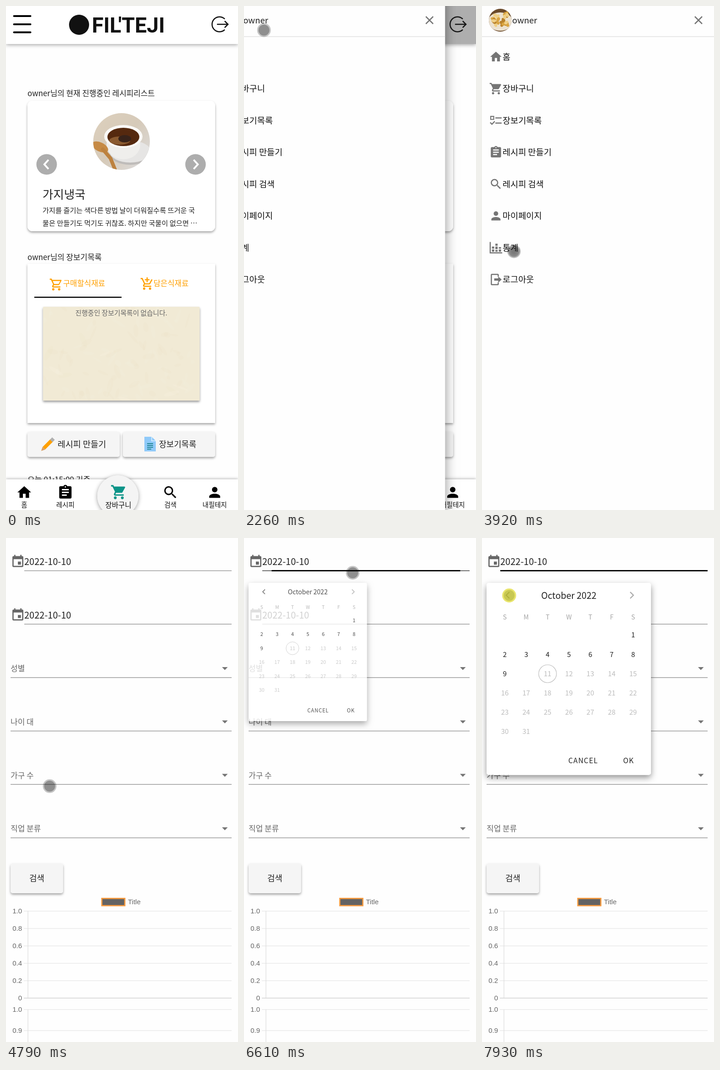
An HTML page with a canvas for the animation above (8 s loop, 508 by 1101 pixels).

```html
<!DOCTYPE html>
<html lang="ko">
<head>
<meta charset="utf-8">
<title>Recipe app</title>
<style>
html, body { margin: 0; width: 100%; height: 100%; overflow: hidden; background: #fff; }
canvas { display: block; width: 100%; height: 100%; }
</style>
</head>
<body>
<canvas id="stage" width="508" height="1101"></canvas>
<script>
const W = 508, H = 1101, LOOP = 8000;
const c = document.getElementById('stage').getContext('2d');
const KR = '"Noto Sans CJK KR", "Noto Sans CJK", "Noto Sans", sans-serif';
const ARIAL = '"Liberation Sans", sans-serif';
const USER = 'owner', BRAND = "FIL'TEJI";
const ORANGE = '#ffa000', GREY = '#757575', INK = '#212121';

const wheels = 'M17 18a2 2 0 1 1 0 4a2 2 0 1 1 0-4zM7 18a2 2 0 1 1 0 4a2 2 0 1 1 0-4z';
const cartBody = 'M1 2H4.27L5.21 4H20A1 1 0 0 1 21 5C21 5.17 20.95 5.34 20.88 5.5L17.3 11.97C16.96 12.58 16.3 13 15.55 13H8.1L7.2 14.63L7.17 14.75A.25 .25 0 0 0 7.42 15H19V17H7C5.89 17 5 16.1 5 15C5 14.65 5.09 14.32 5.24 14.04L6.6 11.59L3 4H1z';
const icons = {
  home: 'M10 20v-6h4v6h5v-8h3L12 3 2 12h3v8z',
  cart: cartBody + wheels,
  cartOpen: cartBody + wheels + 'M16 11L18.78 6H6.14L8.5 11z',
  cartPlus: 'M11 9H13V6H16V4H13V1H11V4H8V6H11zM7.17 14.75L8.1 13H15.55C16.3 13 16.96 12.59 17.3 11.97L21.16 4.96L19.42 4L15.55 11H8.53L4.27 2H1V4H3L6.6 11.59L5.25 14.04A2 2 0 0 0 7 17H19V15H7.42z' + wheels,
  clip: 'M17 9H7V7H17zM17 13H7V11H17zM14 17H7V15H14zM12 3a1 1 0 1 1 0 2a1 1 0 1 1 0-2zM19 3H14.82C14.4 1.84 13.3 1 12 1S9.6 1.84 9.18 3H5A2 2 0 0 0 3 5V19A2 2 0 0 0 5 21H19A2 2 0 0 0 21 19V5A2 2 0 0 0 19 3z',
  search: 'M9.5 3A6.5 6.5 0 0 1 16 9.5C16 11.11 15.41 12.59 14.44 13.73L14.71 14H15.5L20.5 19L19 20.5L14 15.5V14.71L13.73 14.44A6.5 6.5 0 1 1 9.5 3zM9.5 5a4.5 4.5 0 1 0 0 9a4.5 4.5 0 1 0 0-9z',
  person: 'M12 4a4 4 0 1 1 0 8a4 4 0 1 1 0-8zM12 14C16.42 14 20 15.79 20 18V20H4V18C4 15.79 7.58 14 12 14z',
  date: 'M19 19H5V8H19zM16 1V3H8V1H6V3H5A2 2 0 0 0 3 5V19A2 2 0 0 0 5 21H19A2 2 0 0 0 21 19V5A2 2 0 0 0 19 3H18V1zM17 12H12V17H17z',
  checks: 'M2 4h7v7h-7zM3.7 5.7h3.6v3.6h-3.6zM11 6.5h11v2h-11zM11 15.5h11v2h-11zM1.3 16.2l1.4-1.4 2.3 2.3 4.3-4.3 1.4 1.4-5.7 5.7z',
  chart: 'M1 2h2v18h20v2h-22zM5 15h4v4h-4zM5 10h4v3.5h-4zM11 16h4v3h-4zM11 10h4v4.5h-4zM11 5h4v3.5h-4zM17 15h4v4h-4zM17 11h4v2.5h-4z',
  exit: 'M5 2h10a2 2 0 0 1 2 2v3h-2v-3h-10v16h10v-3h2v3a2 2 0 0 1-2 2h-10a2 2 0 0 1-2-2v-16a2 2 0 0 1 2-2zM9 10h7v-3.5l6 5.5-6 5.5v-3.5h-7z'
};
for (const k in icons) icons[k] = new Path2D(icons[k]);

function icon(name, x, y, size, color) {
  c.save();
  c.translate(x - size / 2, y - size / 2);
  c.scale(size / 24, size / 24);
  c.fillStyle = color;
  c.fill(icons[name], 'evenodd');
  c.restore();
}

// y is the optical middle of the line
function text(s, x, y, size, color = INK, align = 'left', family = KR, weight = 400) {
  c.font = `${weight} ${size}px ${family}`;
  c.textAlign = align;
  c.fillStyle = color;
  c.fillText(s, x, y + size * 0.365);
}

function rect(x, y, w, h, color) {
  c.fillStyle = color;
  c.fillRect(x, y, w, h);
}

function disc(x, y, r, color) {
  c.fillStyle = color;
  c.beginPath();
  c.arc(x, y, r, 0, 7);
  c.fill();
}

function oval(x, y, rx, ry, color, turn = 0) {
  c.fillStyle = color;
  c.beginPath();
  c.ellipse(x, y, rx, ry, turn, 0, 7);
  c.fill();
}

function line(color, width, ...p) {
  c.strokeStyle = color;
  c.lineWidth = width;
  c.beginPath();
  for (let i = 0; i < p.length; i += 2) c.lineTo(p[i], p[i + 1]);
  c.stroke();
}

// The shadow is kept outside the box, so see-through panels stay clean.
function panel(x, y, w, h, r, color, dy = 3, blur = 5, alpha = 0.35) {
  const box = new Path2D();
  box.roundRect(x, y, w, h, r);
  const outside = new Path2D(box);
  outside.rect(-W, -H, 3 * W, 3 * H);
  c.save();
  c.clip(outside, 'evenodd');
  c.shadowColor = `rgba(0,0,0,${alpha})`;
  c.shadowBlur = blur;
  c.shadowOffsetY = dy;
  c.fillStyle = color;
  c.fill(box);
  c.restore();
  c.fillStyle = color;
  c.fill(box);
}

function bezier(x1, y1, x2, y2, x) {
  if (x <= 0) return 0;
  if (x >= 1) return 1;
  const at = (a, b, u) => 3 * (1 - u) ** 2 * u * a + 3 * (1 - u) * u * u * b + u ** 3;
  let lo = 0, hi = 1;
  for (let i = 0; i < 24; i++) {
    const mid = (lo + hi) / 2;
    if (at(x1, x2, mid) < x) lo = mid; else hi = mid;
  }
  return at(y1, y2, lo);
}

function seeded(seed) {
  return () => (seed = (seed * 16807) % 2147483647) / 2147483647;
}

function inCircle(x, y, r, draw) {
  c.save();
  c.beginPath();
  c.arc(x, y, r, 0, 7);
  c.clip();
  draw();
  c.restore();
}

function soup() {
  inCircle(253, 296, 62, () => {
    const g = c.createLinearGradient(191, 240, 315, 350);
    g.addColorStop(0, '#ddd0bd');
    g.addColorStop(0.5, '#d6cab9');
    g.addColorStop(1, '#dcdcde');
    rect(190, 233, 126, 126, g);
    oval(272, 322, 45, 25, '#bfbcba');
    oval(272, 318, 45, 24, '#e6e5e4');
    oval(257, 303, 37, 32, '#efeeec');
    oval(257, 285, 42, 25, '#fbfaf8');
    oval(257, 286, 35, 20, '#55290f');
    oval(249, 294, 23, 9, '#8a5a30');
    oval(260, 290, 14, 8, '#38231a');
    oval(206, 308, 19, 10, '#c68a45', 0.45);
    c.lineCap = 'round';
    line('#bd813e', 8, 212, 313, 229, 333, 239, 358);
  });
}

function snack() {
  inCircle(40, 31, 25, () => {
    rect(15, 6, 50, 50, '#6b4a2a');
    oval(40, 34, 27, 20, '#ece2d0');
    const rnd = seeded(41);
    for (let i = 0; i < 26; i++) {
      oval(24 + rnd() * 32, 16 + rnd() * 28, 5, 3.5, ['#d9a441', '#efcf86', '#b9822c'][i % 3], rnd() * 3);
    }
  });
}

function paper() {
  panel(81, 657, 343, 205, 2, '#f1ead5', 3, 5, 0.4);
  c.save();
  c.beginPath();
  c.rect(81, 657, 343, 205);
  c.clip();
  const rnd = seeded(77);
  for (let i = 0; i < 120; i++) {
    oval(81 + rnd() * 343, 657 + rnd() * 205, 4 + rnd() * 14, 2 + rnd() * 4,
      i % 2 ? 'rgba(225,212,175,.08)' : 'rgba(250,246,232,.12)', rnd() * 3);
  }
  c.restore();
}

function arrowButton(x, dir) {
  disc(x, 346, 22.5, '#adadad');
  c.lineCap = 'butt';
  line('#fff', 4, x - 4 * dir, 336, x + 5 * dir, 346, x - 4 * dir, 356);
}

function header() {
  panel(0, -10, W, 93, 0, '#fff', 2, 8, 0.35);
  c.lineCap = 'round';
  for (const y of [22, 40, 57.5]) line('#000', 4, 17.5, y, 53.5, y);
  disc(160, 41, 22, '#111');
  text(BRAND, 188, 41, 46.5, '#111', 'left', 'Roboto, sans-serif', 700);
  c.strokeStyle = '#111';
  c.lineWidth = 2.5;
  c.beginPath();
  c.arc(467.5, 40, 16.3, 0.85, Math.PI * 2 - 0.85);
  c.stroke();
  line('#111', 2.5, 463, 40, 486, 40);
  line('#111', 2.5, 479.5, 33.5, 486, 40, 479.5, 46.5);
}

function nav() {
  panel(0, 1034, W, 80, 0, '#fff', -1, 6, 0.3);
  panel(200, 1025.5, 90, 90, 45, '#f4f4f4', 2, 10, 0.38);
  [['home', 40, '홈'], ['clip', 130, '레시피'], ['search', 360, '검색'], ['person', 457, '내필테지']].forEach(([name, x, label]) => {
    icon(name, x, 1062.5, 36, '#000');
    text(label, x, 1090, 14.5, '#111', 'center');
  });
  icon('cart', 247, 1062, 37, '#0c9488');
  text('장바구니', 246, 1090.5, 15.5, '#111', 'center');
}

function home(t) {
  rect(0, 0, W, H, '#fefefe');
  text(USER + '님의 현재 진행중인 레시피리스트', 47, 191, 16.9);
  panel(47, 207, 411, 285, 11, '#fff');
  soup();
  arrowButton(89, -1);
  arrowButton(415, 1);
  text('가지냉국', 80, 412, 25.5);
  text('가지를 즐기는 색다른 방법 날이 더워질수록 뜨거운 국', 80, 446, 15.3);
  text('물은 만들기도 먹기도 귀찮죠. 하지만 국물이 없으면 …', 80, 474, 15.3);

  text(USER + '님의 장보기목록', 47, 548.5, 16.9);
  panel(47, 563, 411, 348, 0, '#fff');
  icon('cartOpen', 110, 608.5, 31, ORANGE);
  icon('cartPlus', 309, 607, 31, ORANGE);
  text('구매할식재료', 125, 605.5, 16.7, ORANGE, 'left', KR, 500);
  text('담은식재료', 323, 605.5, 16.7, ORANGE, 'left', KR, 500);
  rect(62, 635, 191, 2.5, '#000');
  paper();
  text('진행중인 장보기목록이 없습니다.', 252.5, 671, 14.8, '#666', 'center');

  panel(47, 930, 202, 55, 5, '#f5f5f5');
  panel(256, 930, 202, 55, 5, '#f5f5f5');
  c.lineCap = 'butt';
  line(ORANGE, 8, 83, 966, 100, 949);
  line('#b0b0b0', 8, 99, 950, 104, 945);
  c.fillStyle = '#d9a066';
  c.beginPath();
  c.moveTo(80, 963); c.lineTo(86, 969); c.lineTo(77, 972);
  c.fill();
  text('레시피 만들기', 113, 957.5, 18.5);
  c.fillStyle = '#90caf9';
  c.beginPath();
  c.moveTo(303, 941); c.lineTo(319, 941); c.lineTo(328, 950); c.lineTo(328, 973); c.lineTo(303, 973);
  c.fill();
  line('#e1f5fe', 1.5, 319, 941, 319, 950, 328, 950);
  for (let i = 0; i < 4; i++) rect(309, 955 + i * 4, i === 3 ? 9 : 13, 1.8, '#17808a');
  text('장보기목록', 335, 957.5, 17.8);

  const sec = 9 + (t >= 240) + (t >= 1240);
  text(`오늘 01:15:${String(sec).padStart(2, '0')} 기준`, 47, 1034.5, 17.2);
  header();
  nav();
}

function drawer(p) {
  c.save();
  c.translate(W * (p - 1), 0);
  panel(0, -60, W, H + 120, 0, '#fefefe', 0, p < 1 ? 24 : 0, 0.45);
  rect(0, 66, W, 1.5, '#e2e2e2');
  snack();
  text(USER, 66, 31.5, 18.5);
  c.lineCap = 'butt';
  line(GREY, 2.5, 466, 23, 482, 39);
  line(GREY, 2.5, 482, 23, 466, 39);
  [['home', '홈'], ['cart', '장바구니'], ['checks', '장보기목록'], ['clip', '레시피 만들기'],
   ['search', '레시피 검색'], ['person', '마이페이지'], ['chart', '통계'], ['exit', '로그아웃']].forEach(([name, label], i) => {
    const y = 111 + i * 69.5;
    icon(name, 30.5, y, 30, GREY);
    text(label, 45, y, 18.7, '#111');
  });
  c.restore();
}

function axis(top, step, labels, bottom) {
  labels.forEach((s, i) => {
    const y = top + i * step;
    text(s, 35, y, 15, '#666', 'right', ARIAL);
    rect(39, y - 0.5, 455, 1.2, s === '0' ? '#c8c8c8' : '#e5e5e5');
  });
  rect(47.5, top, 1.2, bottom - top, '#dcdcdc');
}

function stats(t) {
  rect(0, 0, W, H, '#fefefe');
  const focus = bezier(0.25, 0.8, 0.5, 1, (t - 6433) / 300);
  const row = i => 71.5 + 116.7 * i;
  ['2022-10-10', '2022-10-10', '성별', '나이 대', '가구 수', '직업 분류'].forEach((s, i) => {
    const y = row(i), dated = i < 2;
    if (dated) {
      icon('date', 26, y - 20, 32, '#666');
      text(s, 40, y - 20, 20);
    } else {
      text(s, 10, y - 20, 17, '#666');
      c.fillStyle = GREY;
      c.beginPath();
      c.moveTo(473, y - 23); c.lineTo(485.5, y - 23); c.lineTo(479.2, y - 16.5);
      c.fill();
    }
    const x = dated ? 40 : 10;
    rect(x, y - 0.7, 494 - x, 1.4, i === 0 && focus > 0 ? '#333' : '#949494');
  });
  if (focus > 0) rect(267 - 227 * focus, 70, 454 * focus, 2.8, '#000');

  panel(10, 711, 115, 65, 5, '#f5f5f5');
  text('검색', 67.5, 743.5, 18, INK, 'center');
  rect(208.5, 786, 53, 18.5, '#f89b3f');
  rect(211.2, 788.7, 47.6, 13.1, '#636363');
  text('Title', 267, 795, 15, '#666', 'left', ARIAL);
  axis(815, 38, ['1.0', '0.8', '0.6', '0.4', '0.2', '0'], 1005);
  axis(1030, 46, ['1.0', '0.9'], H);

  const open = bezier(0.25, 0.8, 0.5, 1, (t - 6500) / 300);
  if (open > 0) picker(open);
}

function picker(p) {
  c.save();
  c.globalAlpha = Math.min(1, p * 1.1);
  c.translate(10, 98);
  c.scale(p, p);
  c.translate(-10, -98);
  panel(10, 98, 360, 419.5, 5, '#fff', 6, 14, 0.42);
  c.lineCap = 'butt';
  line('#555', 2.3, 60, 118, 53, 125, 60, 132);
  line('#aaa', 2.3, 324.5, 118, 331.5, 125, 324.5, 132);
  text('October 2022', 190, 125.5, 19.5, INK, 'center');
  const col = i => 50 + 46.8 * i;
  [...'SMTWTFS'].forEach((s, i) => text(s, col(i), 172.5, 14, '#a5a5a5', 'center'));
  for (let d = 1; d <= 31; d++) {
    if (d === 10) continue;
    const cell = d + 5;
    text(d, col(cell % 7), 212 + 42.2 * Math.floor(cell / 7), 15, d < 10 ? INK : '#bdbdbd', 'center');
  }
  c.strokeStyle = '#bdbdbd';
  c.lineWidth = 1.2;
  c.beginPath();
  c.arc(143.6, 296.5, 19.5, 0, 7);
  c.stroke();
  c.letterSpacing = '1.2px';
  text('CANCEL', 189, 486, 15.5);
  text('OK', 309, 486, 15.5);
  c.letterSpacing = '0px';
  c.restore();
}

const path = [
  [650, 493, 190], [790, 380, 140], [920, 220, 95], [1050, 95, 66], [1124, 63, 58.5], [1260, 43.7, 52.7],
  [2860, 43.7, 52.7], [3000, 85, 75], [3150, 185, 160], [3300, 255, 300], [3450, 220, 440], [3600, 120, 555],
  [3730, 72, 541], [3800, 70, 536], [4500, 70, 536], [4800, 95, 542], [5100, 145, 552], [5300, 184, 557],
  [5446, 215, 559], [5600, 290, 470], [5800, 405, 260], [5920, 443, 120], [6040, 395, 16], [6130, 335, 38],
  [6300, 255, 72], [6600, 238, 76], [6760, 232, 110], [7000, 194, 218], [7300, 150, 190], [7600, 90, 145],
  [7870, 59.5, 125.5]
];

function pointer(t) {
  if (t < path[0][0]) return;
  let i = path.findIndex(k => k[0] > t);
  if (i < 0) i = path.length;
  const a = path[i - 1], b = path[i] || a;
  const f = b === a ? 0 : (t - a[0]) / (b[0] - a[0]);
  const x = a[1] + (b[1] - a[1]) * f, y = a[2] + (b[2] - a[2]) * f;
  if (t >= 7925) {
    disc(x, y, 15.3, 'rgba(225,220,60,.75)');
    disc(x, y, 12, 'rgba(160,165,50,.45)');
  } else if ((t >= 1450 && t < 2050) || (t >= 3915 && t < 4515)) {
    const g = c.createRadialGradient(x, y, 4, x, y, 15.5);
    g.addColorStop(0, 'rgba(0,0,0,.52)');
    g.addColorStop(0.6, 'rgba(0,0,0,.45)');
    g.addColorStop(1, 'rgba(0,0,0,.1)');
    disc(x, y, 15, g);
  } else {
    disc(x, y, 15, 'rgba(0,0,0,.22)');
    disc(x, y, 12, 'rgba(0,0,0,.28)');
  }
}

// start, end and number of updates of each burst
const bursts = [[650, 1260, 10], [2050, 2400, 6], [2930, 3730, 12], [4520, 5300, 12],
  [5370, 6130, 11], [6200, 7000, 13], [7070, 7870, 13]];

function snap(t) {
  for (const [from, to, n] of bursts) {
    if (t >= from && t <= to) {
      const step = (to - from) / (n - 1);
      return Math.min(to, from + step * Math.floor((t - from) / step + 0.25));
    }
  }
  return t;
}

function draw(real) {
  const t = snap(real);
  c.clearRect(0, 0, W, H);
  if (t < 4515) {
    const p = bezier(0.4, 0, 0.2, 1, (t - 2040) / 374);
    if (p < 1) home(real);
    if (p > 0) {
      rect(0, 0, W, 83, `rgba(33,33,33,${0.38 * Math.min(1, p * 1.1)})`);
      drawer(p);
    }
  } else {
    stats(t);
  }
  pointer(t);
}

const begin = performance.now();
function tick() {
  draw((performance.now() - begin) % LOOP);
  requestAnimationFrame(tick);
}
tick();
</script>
</body>
</html>
```
